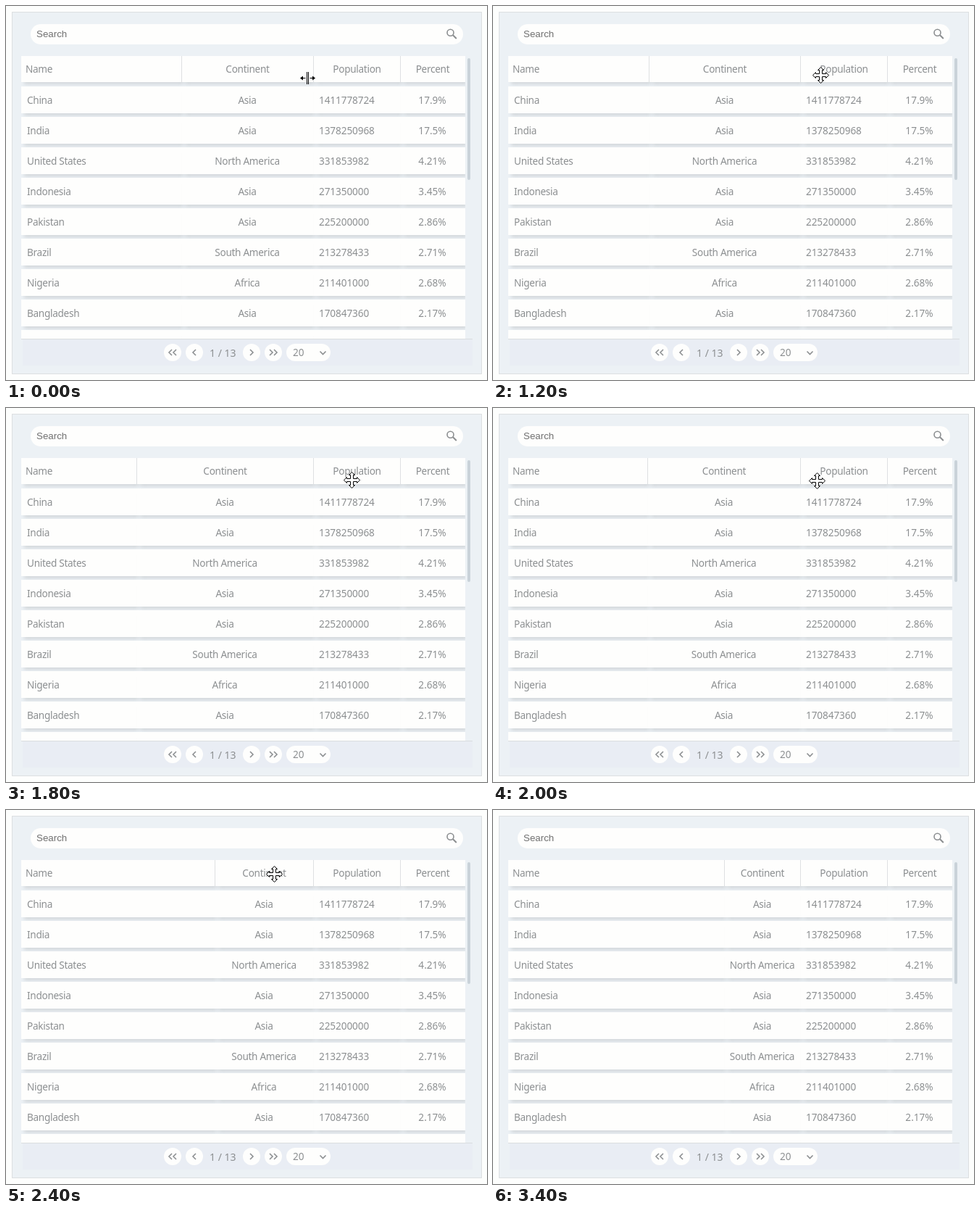
An HTML page for the animation above (4.2 s loop, 664 by 516 pixels).

```html
<!DOCTYPE html>
<html lang="en">
<head>
<meta charset="utf-8">
<title>Resizable table columns</title>
<style>
  html, body { margin: 0; width: 100%; height: 100%; overflow: hidden; background: #fdfefd; }
  body { position: relative; color: #8c8f91; font: 13.6px "Noto Sans", sans-serif; }
  body > * { position: absolute; box-sizing: border-box; }
  .panel { left: 8px; top: 8px; width: 649px; height: 500px; border: 1px solid #dcdfe1; background: #ecf1f5; }
  .search { left: 34px; top: 25px; width: 597px; height: 28px; border-radius: 14px; padding-left: 8px;
    background: #fefefd; color: #707070; font: 13.333px/28px "Liberation Sans", sans-serif; }
  .view { left: 21px; top: 69px; width: 613px; height: 390px; overflow: hidden; }
  .row { display: grid; grid-template-columns: calc(var(--split) * 1px - 21px) 1fr 120px 89px;
    height: 36px; margin-bottom: 6px; line-height: 37px; }
  .row > div { box-sizing: border-box; background: #fefefd; border-right: 1px solid transparent; text-align: center;
    padding-right: 1px; white-space: nowrap; letter-spacing: -.3px; box-shadow: 3px 4px 5px -1px rgba(0, 0, 0, .11); }
  .row > div:nth-child(1) { padding-left: 8px; text-align: left; }
  .row > div:nth-child(3) { padding-left: 7px; text-align: left; letter-spacing: -.1px; }
  .row > div:nth-child(4) { letter-spacing: 0; }
  .row.head { height: 35px; margin-bottom: 7px; line-height: 36px; }
  .row.head > div { border-color: #dfe1e3; padding: 0; letter-spacing: -.3px; }
  .row.head > div:nth-child(1) { padding-left: 6px; }
  .row.head > div:nth-child(3) { padding: 0; text-align: center; }
  .row.head > div:nth-child(4) { border-color: transparent; }
  .thumb { left: 637px; top: 72px; width: 4px; height: 168px; border-radius: 2px; background: #c9d2d9; }
  .rule { left: 21px; top: 459px; width: 623px; height: 1px; background: #dadddf; }
  .footer { left: 23px; top: 460px; width: 621px; height: 36px; background: #e9edf4; }
  .page { left: 281px; top: 466px; font-size: 14px; line-height: 25px; }
  .size { left: 387px; top: 466px; width: 61px; height: 24px; border-radius: 12px; padding-left: 9px;
    background: #fefefd; line-height: 24px; }
  svg { left: 0; top: 0; }
</style>
</head>
<body>
<div class="panel"></div>
<div class="search">Search</div>
<div class="view" id="view"></div>
<div class="thumb"></div>
<div class="rule"></div>
<div class="footer"></div>
<div class="page">1 / 13</div>
<div class="size">20</div>
<svg width="664" height="516" fill="none">
  <g stroke="#8c8f91" stroke-width="1.6">
    <g fill="#fefefd" stroke="none">
      <circle cx="230" cy="478" r="12"/><circle cx="260" cy="478" r="12"/>
      <circle cx="339" cy="478" r="12"/><circle cx="369" cy="478" r="12"/>
    </g>
    <path d="M229 474l-4 4l4 4M235 474l-4 4l4 4M262 474l-4 4l4 4M337 474l4 4l-4 4M364 474l4 4l-4 4M370 474l4 4l-4 4"/>
    <path d="M433.5 476.5l4 4l4-4"/>
    <circle cx="613.5" cy="36.7" r="4.5"/>
    <path d="M616.8 40l5 5" stroke-width="2"/>
  </g>
  <g id="resize">
    <path d="M-1-8.5V8.5M1-8.5V8.5M-7 0H-3M3 0H7" stroke="#000"/>
    <path d="M-10.5 0l4-3v6zM10.5 0l-4-3v6z" fill="#000"/>
  </g>
  <path id="arrow" d="M.5.5V16.5L4.2 13L6.8 18.5L9 17.5L6.5 12H11.5Z" fill="#fff" stroke="#000"/>
  <path id="move" fill="#fff" stroke="#000" d="M-2-2V-7H-4L0-11L4-7H2V-2H7V-4L11 0L7 4V2H2V7H4L0 11L-4 7H-2V2H-7V4L-11 0L-7-4V-2Z"/>
</svg>
<script>
const rows = [
  ["Name", "Continent", "Population", "Percent"],
  ["China", "Asia", "1411778724", "17.9%"],
  ["India", "Asia", "1378250968", "17.5%"],
  ["United States", "North America", "331853982", "4.21%"],
  ["Indonesia", "Asia", "271350000", "3.45%"],
  ["Pakistan", "Asia", "225200000", "2.86%"],
  ["Brazil", "South America", "213278433", "2.71%"],
  ["Nigeria", "Africa", "211401000", "2.68%"],
  ["Bangladesh", "Asia", "170847360", "2.17%"],
  ["", "", "", ""],
];

// start time in ms, column edge, pointer shape, pointer position
const steps = [
  [0, 243, "resize", 416.5, 99.5],
  [800, 243, "arrow", 424, 88],
  [1000, 233, "move", 433.5, 93.5],
  [1200, 216, "move", 452.5, 95.5],
  [1400, 199, "move", 470.5, 97.5],
  [1600, 169, "move", 494.5, 98.5],
  [1800, 181, "move", 477.5, 99.5],
  [2000, 214, "move", 447.5, 100.5],
  [2200, 248, "move", 409.5, 94.5],
  [2400, 289, "move", 370.5, 88.5],
  [2600, 314, "move", 345.5, 89.5],
  [2800, 320, "move", 342.5, 90.5],
  [3000, 320, "none", 0, 0],
];

const view = document.getElementById("view");
view.innerHTML = rows.map((cells, i) =>
  `<div class="row${i ? "" : " head"}">${cells.map(c => `<div>${c}</div>`).join("")}</div>`).join("");
const pointers = ["resize", "arrow", "move"].map(id => document.getElementById(id));

function draw(now) {
  const time = now % 4200;
  const [, split, shape, x, y] = steps.findLast(step => step[0] <= time);
  view.style.setProperty("--split", split);
  for (const pointer of pointers) {
    pointer.style.display = pointer.id === shape ? "" : "none";
    pointer.setAttribute("transform", `translate(${x} ${y})`);
  }
  requestAnimationFrame(draw);
}
draw(performance.now());
</script>
</body>
</html>
```
